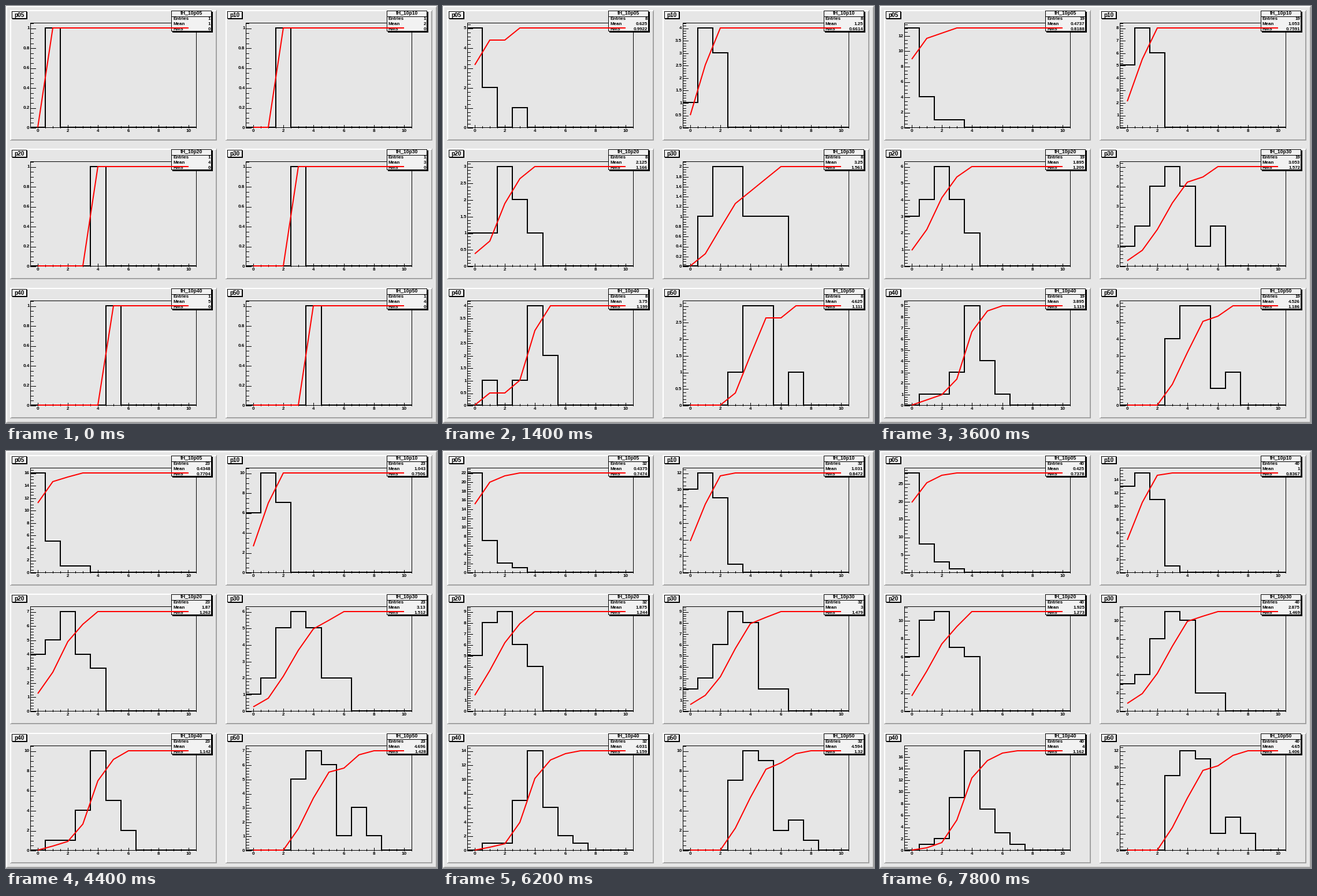
A matplotlib script that plays this animation: 746x722 px, repeating every 8000 ms.

```python
import math

import numpy as np
import matplotlib.pyplot as plt
from matplotlib.animation import FuncAnimation
from matplotlib.patches import Rectangle

W, H, DPI = 746, 722, 64
PT = 72 / DPI                       # points per pixel
FRAMES, STEP_MS = 40, 200
BINS = np.arange(11)
BACK, BOX, DARK = "#e6e6e6", "#f2f2f2", "#a1a1a1"
LEFT, TOP, RIGHT, BASE = 42, 29, 329, 210
UNIT = 26.105                       # pixels per bin

plt.rcParams["font.family"] = "Liberation Sans"
plt.rcParams["font.weight"] = "bold"
plt.rcParams["path.simplify"] = False

fig = plt.figure(figsize=(W / DPI, H / DPI), dpi=DPI)
ax = fig.add_axes([0, 0, 1, 1])
ax.set_xlim(0, W)
ax.set_ylim(H, 0)
ax.axis("off")


def rect(x0, y0, x1, y1, color, z=1):
    ax.add_patch(Rectangle((x0, y0), x1 - x0, y1 - y0, fc=color, lw=0,
                           antialiased=False, zorder=z))


def line(width, color="black", z=2, smooth=False):
    return ax.plot([], [], color=color, lw=width * PT, zorder=z,
                   antialiased=smooth, snap=not smooth,
                   solid_joinstyle="miter", solid_capstyle="butt")[0]


def label(x, y, text="", size=8, ha="center"):
    return ax.text(x, y, text, fontsize=size * PT, ha=ha, va="baseline",
                   zorder=5)


def bevel(x0, y0, x1, y1):
    rect(x0, y0, x1, y1, DARK)
    rect(x0, y0, x1 - 1, y0 + 2, "white")
    rect(x0, y0, x0 + 2, y1 - 1, "white")
    rect(x0 + 2, y0 + 2, x1 - 2, y1 - 2, BACK)


def shadow_box(x0, y0, x1, y1, depth):
    rect(x0 + depth, y0 + depth, x1 + depth, y1 + depth, "black", 4)
    rect(x0, y0, x1, y1, "black", 4)
    rect(x0 + 1, y0 + 1, x1 - 1, y1 - 1, BOX, 4)


def nice_step(span, parts):
    """Round span/parts up to 1, 2 or 5 times a power of ten."""
    raw = span / parts
    power = 10.0 ** math.floor(math.log10(raw) + 1e-9)
    lead = raw / power - 1e-9
    for limit, step in ((1, 1), (2.5 if parts == 10 else 2, 2), (5, 5)):
        if lead <= limit:
            return step * power
    return 10 * power


def set_strokes(artist, strokes):
    """Draw separate two-point strokes, broken by gaps."""
    gap = (np.nan, np.nan)
    points = [p for a, b in strokes for p in (a, b, gap)]
    artist.set_data(*zip(*points))


def deal(first, *goals):
    """Add one draw at a time, moving evenly from goal to goal."""
    draws = [first]
    for goal in goals:
        start = np.bincount(draws, minlength=BINS.size)
        quota = np.pad(goal, (0, BINS.size - len(goal))) - start
        size = quota.sum()
        given = np.zeros(BINS.size)
        for k in range(1, size + 1):
            b = int(np.argmax(quota * k / size - given))
            given[b] += 1
            draws.append(b)
    return draws


class Panel:
    def __init__(self, name, col, row, draws):
        self.draws = draws
        self.dx, self.dy = 373 * col, (0, 240, 481)[row]
        dx, dy = self.dx, self.dy
        bevel(7 + dx, 7 + dy, 365 + dx, 233 + dy)

        x0, x1, y0, y1 = LEFT + dx, RIGHT + dx, TOP + dy, BASE + dy
        rect(x0, y0, x1 + 1, y1 + 1, "black")
        rect(x0 + 1, y0 + 1, x1, y1, BACK)
        set_strokes(line(1), [
            ((self.px(i / 2), y1 + 1),
             (self.px(i / 2), y1 - (2 if i % 4 else 4))) for i in range(22)])
        for v in range(0, 11, 2):
            label(self.px(v), y1 + 8, str(v))

        shadow_box(10 + dx, 9 + dy, 36 + dx, 22 + dy, 1)
        label(22.8 + dx, 19 + dy, name, 10)
        shadow_box(286 + dx, 8 + dy, 356 + dx, 44 + dy, 2)
        rect(286 + dx, 18 + dy, 356 + dx, 19 + dy, "black", 4)
        title = label(321.5 + dx, 15 + dy, "fH_10" + name, 8.5)
        if row == 0:
            title.set_clip_path(Rectangle((280 + dx, 10), 80, 30,
                                          transform=ax.transData))
        self.values = []
        for i, word in enumerate(("Entries", "Mean", "RMS")):
            y = 24 + 9 * i + dy
            label(289 + dx, y, word, ha="left")
            self.values.append(label(354 + dx, y, ha="right"))

        self.ticks = line(1)
        self.hist = line(2, z=3)
        self.curve = line(2, "#ff0000", 6, smooth=True)
        self.scale = [label(40.5 + dx, 0, ha="right") for _ in range(14)]

    def px(self, v):
        return LEFT + self.dx + (v + .5) * UNIT

    def show(self, n):
        counts = np.bincount(self.draws[:n], minlength=BINS.size)
        peak = counts.max()
        top = 1.05 * peak

        def py(v):
            return BASE + .1 + self.dy - v * (BASE - TOP) / top

        edges = np.repeat(np.arange(BINS.size + 1) - .5, 2)[1:-1]
        self.hist.set_data(self.px(edges), py(np.repeat(counts, 2)))
        self.curve.set_data(np.round(self.px(BINS)),
                            np.round(py(np.cumsum(counts) * peak / n)))

        step = nice_step(top, 10)
        minor = nice_step(step, 5)
        per = round(step / minor)
        x = LEFT + self.dx
        heights = [py(i * minor) + 1 for i in range(int(top / minor + 1e-6) + 1)]
        set_strokes(self.ticks, [((x, y), (x + (5 if i % per else 9), y))
                                 for i, y in enumerate(heights)])

        last = int(top / step + 1e-6)
        for i, text in enumerate(self.scale):
            text.set_text("%g" % round(i * step, 6) if i <= last else "")
            text.set_y(py(min(i, last) * step) + 2.7)

        mean = (BINS * counts).sum() / n
        rms = math.sqrt(max(0, (BINS ** 2 * counts).sum() / n - mean ** 2))
        for text, v in zip(self.values, (n, mean, rms)):
            text.set_text("%.4g" % v)


bevel(0, 0, W, H)

# First draw, then the histogram after 12 and after 40 draws.
panels = [
    Panel("p05", 0, 0, deal(1, (8, 3, 0, 1), (28, 8, 3, 1))),
    Panel("p10", 1, 0, deal(2, (2, 6, 4), (13, 15, 11, 1))),
    Panel("p20", 0, 1, deal(4, (2, 2, 4, 3, 1), (6, 10, 11, 7, 6))),
    Panel("p30", 1, 1, deal(3, (0, 1, 3, 3, 2, 1, 2),
                            (3, 4, 8, 11, 10, 2, 2))),
    Panel("p40", 0, 2, deal(5, (0, 1, 0, 1, 6, 3, 1),
                            (0, 1, 2, 9, 17, 7, 3, 1))),
    Panel("p50", 1, 2, deal(4, (0, 0, 0, 2, 4, 4, 0, 2),
                            (0, 0, 0, 9, 12, 11, 2, 4, 2))),
]


def update(frame):
    for panel in panels:
        panel.show(frame + 1)
    return []


anim = FuncAnimation(fig, update, frames=FRAMES, interval=STEP_MS,
                     init_func=lambda: update(0), repeat=True,
                     repeat_delay=0, blit=False)
plt.show()
```
